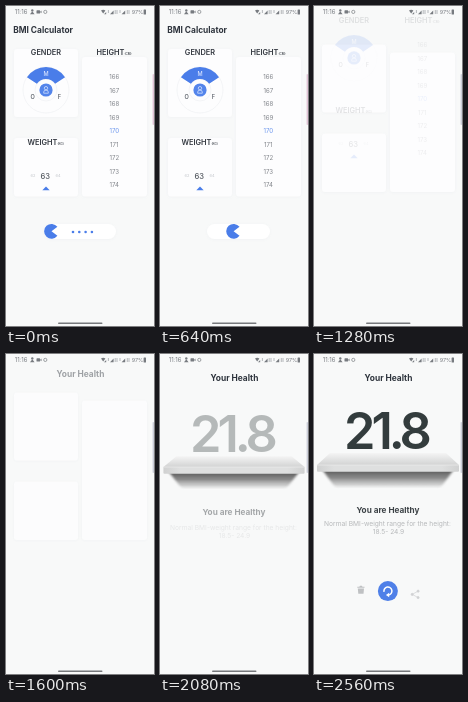
Recreate the animation shown at these times as an HTML page. Size 148 px wide and 320 px high, loop 2.64 s.

```html
<!DOCTYPE html>
<html lang="en">
<head>
<meta charset="utf-8">
<title>BMI Calculator</title>
<style>
  html, body { margin: 0; width: 100%; height: 100%; overflow: hidden; background: #f8f9f9; }
  svg { display: block; width: 100vw; height: 100vh; font-family: Inter, Roboto, sans-serif; }
  .mid { text-anchor: middle; }
  .title { font-size: 8.4px; font-weight: 700; fill: #2e343d; }
  .label { font-size: 7.4px; font-weight: 600; fill: #343941; }
  .unit { font-size: 3px; font-weight: 500; }
  .letter { font-size: 5.6px; font-weight: 500; fill: #555b64; }
  .num { font-size: 6.1px; fill: #80848a; }
  .side { font-size: 4px; fill: #c4c7cc; }
  .status { font-size: 6px; fill: #777b80; }
  .result { font-size: 50.5px; font-weight: 600; letter-spacing: -4px; fill: #333c3d; }
  .healthy { font-size: 8.2px; font-weight: 700; fill: #3c4246; }
  .range { font-size: 6.67px; fill: #b6b8ba; }
</style>
</head>
<body>
<svg viewBox="0 0 148 320" preserveAspectRatio="none">
  <defs>
    <linearGradient id="topFill" x2="0" y2="1">
      <stop offset="0" stop-color="#f4f4f4"/><stop offset="1" stop-color="#d2d3d3"/>
    </linearGradient>
    <linearGradient id="faceFill">
      <stop offset="0" stop-color="#d0d1d1"/><stop offset=".12" stop-color="#dedfdf"/>
      <stop offset=".88" stop-color="#dedfdf"/><stop offset="1" stop-color="#d0d1d1"/>
    </linearGradient>
    <linearGradient id="shadeFill" x2="0" y2="1">
      <stop offset="0" stop-color="#5c5c5c"/>
      <stop offset=".4" stop-color="#707070" stop-opacity=".8"/>
      <stop offset=".75" stop-color="#8a8a8a" stop-opacity=".4"/>
      <stop offset="1" stop-color="#aaa" stop-opacity="0"/>
    </linearGradient>
    <filter id="soft" x="-10%" y="-30%" width="120%" height="160%"><feGaussianBlur stdDeviation="1.5 .6"/></filter>
    <filter id="lift" x="-10%" y="-10%" width="120%" height="125%">
      <feDropShadow dx="0" dy=".5" stdDeviation="1" flood-color="#8a93a8" flood-opacity=".08"/>
    </filter>
  </defs>
  <rect width="148" height="320" fill="#f8f9f9"/>

  <g id="cards" fill="#fdfdfe" filter="url(#lift)">
    <rect x="8" y="43" width="64" height="68" rx="3"/>
    <rect x="8" y="132" width="64" height="58.5" rx="3"/>
    <rect x="76" y="51" width="65" height="139.5" rx="3"/>
  </g>
  <text id="heading" class="title" x="7.2" y="27">BMI Calculator</text>

  <g id="form">
    <text class="label mid" x="40" y="49">GENDER</text>
    <text class="label" x="90.5" y="49.4">HEIGHT<tspan class="unit">(CM)</tspan></text>
    <text class="label" x="21.5" y="138.9">WEIGHT<tspan class="unit">(KG)</tspan></text>
    <g fill="none" stroke="#eceef1" stroke-width=".6">
      <circle cx="40" cy="84" r="23"/><circle cx="40" cy="84" r="11"/>
    </g>
    <path id="sector" fill="#4a7de9"/>
    <circle cx="40" cy="84" r="6.6" fill="#5485eb"/>
    <g fill="none" stroke="#e4ecff" stroke-width=".7">
      <circle cx="40" cy="82.2" r="1.7"/><path d="M37.7 87.2v-1a2.3 2.1 0 0 1 4.6 0v1z"/>
    </g>
    <text class="letter mid" x="40" y="70" style="fill:#dbe5ff">M</text>
    <text class="letter mid" x="26.7" y="93">O</text>
    <text class="letter mid" x="53.3" y="93">F</text>
    <text class="side mid" x="27" y="171.4">62</text>
    <text class="mid" x="39.2" y="173" font-size="7.6" font-weight="500" fill="#555a61">63</text>
    <text class="side mid" x="52" y="171.4">64</text>
    <path d="M36.3 184.2 40 180.6 43.7 184.2z" fill="#4a7de9"/>
    <g id="heights"></g>
  </g>

  <g id="slider">
    <rect id="track" y="218" height="15" rx="7.5" fill="#fff" filter="url(#lift)"/>
    <g id="dots" fill="#4a7de9"></g>
    <path id="pac" fill="#4a7de9"/>
  </g>

  <text id="health" class="title mid" x="74.5" y="27.4">Your Health</text>
  <g id="shelf">
    <path id="shade" fill="url(#shadeFill)" filter="url(#soft)"/>
    <path id="top" fill="url(#topFill)"/>
    <path id="face" fill="url(#faceFill)"/>
    <path id="rim" stroke="#ececec" stroke-width=".7"/>
  </g>
  <text id="result" class="result mid" x="72" y="95">21.8</text>
  <g id="verdict">
    <text class="healthy mid" x="74" y="158.8">You are Healthy</text>
    <g id="range" class="range mid">
      <text x="73.5" y="172">Normal BMI-weight range for the height:</text>
      <text x="74.5" y="179.6">18.5- 24.9</text>
    </g>
  </g>

  <g id="trash" fill="#bfc1c3">
    <path d="M43.3 232.3h2l.7-.9h1.8l.7.9h2v1.1h-7.2zM43.8 234.1h6.2l-.5 5.2h-5.2z"/>
  </g>
  <g id="again">
    <circle cx="73.9" cy="236.2" r="10" fill="#4f80e8"/>
    <path d="M70 236.9a4 4 0 1 1 4.6 3.2" fill="none" stroke="#fff" stroke-width="1.5"/>
    <path d="M75.2 237.8v4.6l-3.3-2.3z" fill="#fff"/>
  </g>
  <g id="share" fill="#bfc1c3" stroke="#bfc1c3" stroke-width=".7">
    <path d="M104.1 232.7 98.2 235.9 104.1 239.1" fill="none"/>
    <circle cx="104.1" cy="232.7" r="1.1"/><circle cx="98.2" cy="235.9" r="1.1"/><circle cx="104.1" cy="239.1" r="1.1"/>
  </g>

  <g class="status">
    <text x="8.7" y="8.2">11:16</text>
    <circle cx="26.3" cy="4.4" r="1.2"/><path d="M24 8.2 26.3 5.2 28.6 8.2z"/>
    <rect x="30.5" y="4.3" width="3.6" height="3.2" rx=".6"/><path d="M34 5.9 35.5 4.6V7.2z"/>
    <circle cx="39.3" cy="5.9" r="1.6" fill="none" stroke="#777b80" stroke-width=".7"/>
    <path d="M95 4.6Q97.2 2.8 99.4 4.6L97.2 7.6z"/>
    <path d="M98 8.2h2.2V6z"/>
    <path d="M104 8.2h3.6V4.4zM115.6 8.2h3.6V4.4z"/>
    <path d="M102.4 7V4M109.2 8V4M111 8V4M114 7V4M121.3 8V4M123 8V4" stroke="#9a9da1" stroke-width=".7"/>
    <text x="125.8" y="8.2" font-size="5.4">97%</text>
    <rect x="137.6" y="3.6" width="2.4" height="4.8" rx=".5"/>
  </g>
  <rect id="edge" x="146.6" y="68" width="1.4" height="51" rx=".7"/>
  <rect x="52" y="316.6" width="44.5" height="1.5" rx=".75" fill="#77797c"/>
</svg>

<script>
const LOOP = 2640;
const $ = id => document.getElementById(id);
const clamp = v => Math.min(1, Math.max(0, v));
const ramp = (t, from, to) => clamp((t - from) / (to - from));
const smooth = p => p * p * (3 - 2 * p);
const set = (id, attrs) => {
  for (const name in attrs) $(id).setAttribute(name, attrs[name]);
};
const place = (id, y, opacity) => set(id, { transform: `translate(0 ${y})`, opacity });
const polar = (x, y, r, deg) => {
  const a = deg * Math.PI / 180;
  return `${x + r * Math.cos(a)} ${y + r * Math.sin(a)}`;
};

// Fixed parts made by rule
set('sector', {
  d: `M${polar(40, 84, 23, -146)}A23 23 0 0 1 ${polar(40, 84, 23, -34)}` +
     `L${polar(40, 84, 11, -34)}A11 11 0 0 0 ${polar(40, 84, 11, -146)}z`
});
$('heights').innerHTML = Array.from({ length: 9 }, (_, i) =>
  `<text class="num mid" x="108.3" y="${73.2 + i * 13.5}"${i === 4 ? ' style="fill:#6f98ed"' : ''}>${166 + i}</text>`
).join('');
$('dots').innerHTML = [67, 73.3, 79.6, 85.9].map(x => `<circle cx="${x}" cy="226" r="1.3"/>`).join('');

// The picture changes in alternating holds of 160 and 80 ms
function hold(t) {
  if (t < 160) return 0;
  const p = t % 240;
  return t - p + (p < 80 ? -80 : p < 160 ? 80 : 160);
}

function drawSlider(t) {
  const x = 45.5 + 58 * smooth(ramp(t, 400, 890));
  const left = 38 + 0.32 * (x - 45.5);
  const mouth = 36 * Math.abs(Math.cos(Math.PI * t / 320)) + 1;
  set('track', { x: left, width: 110 - left });
  set('pac', { d: `M${x} 225.3L${polar(x, 225.3, 7.4, mouth)}A7.4 7.4 0 1 1 ${polar(x, 225.3, 7.4, -mouth)}z` });
  set('dots', { opacity: 1 - ramp(t, 480, 640) });
  set('slider', { opacity: 1 - ramp(t, 820, 1030) });
}

function drawForm(t) {
  const s = Math.max(0, t - 857);
  place('form', -1.79e-4 * s * s, 1 - ramp(t, 1010, 1320));
  set('heading', { opacity: 1 - ramp(t, 890, 1030) });
  place('cards', -4.5 * ramp(t, 880, 1040), t < 2000 ? 1 - 0.25 * ramp(t, 1280, 1840) : 0);
}

function drawShelf(t, g) {
  const y = 111 + 19 * g, inset = 4 * g;
  const l = 3 + inset, r = 145 - inset, b = y + 6.8;
  const depth = 12 * (1 - g), drop = 5 + 12 * (1 - g);
  set('top', { d: `M${l + 13} ${y - depth}H${r - 13}L${r} ${y}H${l}z` });
  set('face', { d: `M${l} ${y}H${r}V${b - 1}Q${r} ${b} ${r - 1} ${b}H${l + 1}Q${l} ${b} ${l} ${b - 1}z` });
  set('rim', { d: `M${l} ${y}H${r}` });
  set('shade', {
    d: `M${l + 6} ${b - 1}H${r - 6}L${r - 19} ${b + drop}H${l + 19}z`,
    opacity: ramp(t, 1760, 2060)
  });
  set('shelf', { opacity: ramp(t, 1760, 1880) });
}

function drawIcon(id, t, start) {
  place(id, 16 * Math.exp(-Math.max(0, t - start) / 110), ramp(t, start, start + 200));
}

function draw(time) {
  const t = hold(time % LOOP);
  const g = Math.exp(-Math.max(0, t - 1840) / 107);
  drawSlider(t);
  drawForm(t);
  drawShelf(t, g);
  const enter = ramp(t, 1440, 1800);
  place('health', -8 * (1 - smooth(enter)), enter);
  place('result', 24 * g, ramp(t, 1960, 2320));
  place('verdict', 25 * g, ramp(t, 1950, 2240));
  place('range', 16 * g, 0.6 + 0.4 * ramp(t, 2080, 2320));
  drawIcon('trash', t, 2160);
  drawIcon('again', t, 2240);
  drawIcon('share', t, 2420);
  set('edge', { fill: t < 880 ? '#e0c3d6' : '#cbced9' });
}

const begin = performance.now();
function tick() {
  draw(performance.now() - begin);
  requestAnimationFrame(tick);
}
tick();
</script>
</body>
</html>
```
